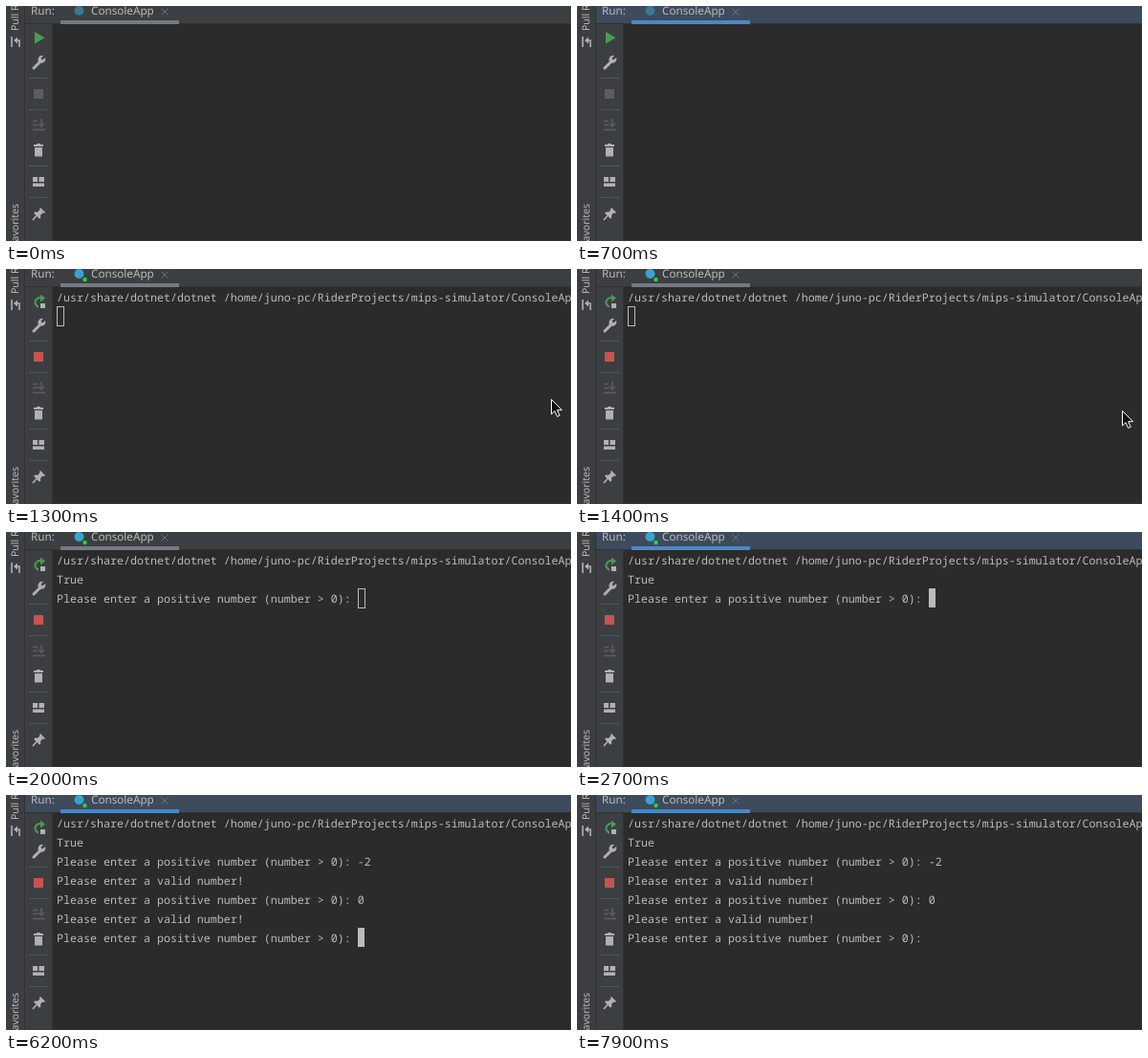
An HTML page that plays this animation: 591x246 px, repeating every 8000 ms.

```html
<!DOCTYPE html>
<html lang="en">
<head>
<meta charset="utf-8">
<title>Console run</title>
<style>
  html, body { margin: 0; width: 100%; height: 100%; overflow: hidden; background: #2b2b2b; }
  svg { display: block; width: 591px; height: 246px; }
  text { font: 11.7px "Noto Sans", sans-serif; fill: #bbb; white-space: pre; text-rendering: geometricPrecision; }
  .mono text { font: 11.667px "Noto Sans Mono", monospace; }
  .side text { font-size: 10.5px; }
  .code text { fill: #a9b7c6; }
  .code .num { fill: #606366; }
  .code tspan { fill: #cc7832; }
  .tree .cs { font-weight: 700; font-size: 12px; fill: #8cc474; }
  .panel { fill: #3c3f41; }
  .edge { fill: #323232; }
  .on { fill: #afb1b3; }
  .off { fill: #5b5d5f; }
  .line { fill: none; stroke: #afb1b3; stroke-width: 1.6; }
  .line.dim { stroke: #5b5d5f; }
  .sep { stroke: #515456; }
</style>
</head>
<body>
<svg viewBox="0 0 591 246">
  <rect width="591" height="246" fill="#2b2b2b"/>
  <rect class="panel" width="48" height="246"/>
  <path class="edge" d="M19 0h1v246h-1zM48 0h1v246h-1zM590 19h1v227h-1zM49 245h542v1h-542z"/>

  <g class="side">
    <text transform="translate(13 26) rotate(-90)">Pull Requests</text>
    <text transform="translate(13 207) rotate(-90)" text-anchor="end">Favorites</text>
    <path class="line" d="M6 32v11M14 43v-7h-4"/>
    <path class="on" d="M8 36l4-3.5v7z"/>
  </g>

  <g id="run">
    <rect id="runHead" x="20" width="571" height="18"/>
    <rect class="edge" x="20" y="18" width="571" height="1"/>
    <rect id="runBar" x="57" y="15" width="124" height="4"/>
    <text x="26" y="9">Run:</text>
    <circle id="badge" cx="76.5" cy="5" r="5"/>
    <text x="89" y="9">ConsoleApp</text>
    <path d="M162.500 2.500l7 7m0-7l-7 7" stroke="#6e7173" fill="none"/>

    <path id="play" d="M30 27l10.500 6.200L30 39.500z" fill="#499c54"/>
    <g id="live">
      <circle cx="82.500" cy="11" r="2.200" fill="#1fdc36"/>
      <path d="M34 39.500a4.700 4.700 0 1 1 2.500-9.200" fill="none" stroke="#499c54" stroke-width="2"/>
      <path d="M36 26.500l5 4-5 4z" fill="#499c54"/>
      <rect x="36" y="36" width="5" height="5" fill="#afb1b3"/>
    </g>
    <path d="M29 65l6-6" stroke="#afb1b3" stroke-width="3" stroke-linecap="round"/>
    <path class="on" d="M39 52l-2.500 2.800 1.700 1.700L41 54a4.200 4.200 0 0 1-6 5.200A4.200 4.200 0 0 1 39 52z"/>
    <rect id="stop" x="29" y="87" width="10" height="10"/>
    <path class="line dim" d="M28 120.500h5M28 124.500h5M28 129.500h13M37 118v8m-3-3l3 3 3-3" stroke-width="1.300"/>
    <path class="on" d="M32 144h4v1h3v2H29v-2h3zM30 148h8v9.500h-8z"/>
    <path class="on" d="M28 179h5v5h-5zM34.500 179h5.500v5h-5.500zM28 185.500h12v3.500h-12z"/>
    <path class="on" d="M36 211l5 5-1 1-1.500-.5-2.500 2.500.3 2.500-1.300 1.300-6-6 1.300-1.300 2.700.2 2.500-2.500-.5-1.200z"/>
    <path class="line" d="M32 219.500l-4 4.500"/>
    <path class="sep" d="M24 75.500h20M24 108.500h20M24 167.500h20M24 200.500h20"/>

    <g id="console" class="mono"></g>
    <rect id="caret" stroke="#bbb"/>
  </g>

  <g id="build">
    <svg width="591" height="82">
      <rect class="panel" x="20" width="304" height="82"/>
      <g id="tree" class="tree"></g>
    </svg>
    <svg width="591" height="59">
      <rect x="324" width="267" height="59" fill="#2b2b2b"/>
      <rect x="325" width="75" height="59" fill="#313335"/>
      <path d="M399.500 0v59" stroke="#555"/>
      <path d="M432.500 0v59M460.500 0v59M488.500 0v14" stroke="#393939"/>
      <g id="code" class="mono code"></g>
      <rect x="405" y="51" width="186" height="8" fill="#a6a6a6" opacity=".3"/>
    </svg>
    <rect x="324" y="59" width="267" height="24" fill="#313335"/>
    <path class="panel" d="M324 59h56l8 12-8 12h-56zM466 59h125v24H466l8-12z"/>
    <text x="411" y="75">()</text>
    <text x="427" y="75">Parser</text>
    <path d="M493 65l4 4-4 4-4-4zM499 67l3 3-3 3-3-3zM498 73l3.500 2.500-3.500 2.500-3-2.500z" fill="#d9a343"/>
    <text x="506" y="75">MipsParser</text>

    <rect class="edge" x="20" y="82" width="571" height="1"/>
    <rect x="20" y="83" width="571" height="27" fill="#3d4b5c"/>
    <rect x="64" y="106" width="116" height="4" fill="#4a88c7"/>
    <text x="26" y="100">Build:</text>
    <text x="76" y="100">Executing build...</text>

    <path d="M30 120l9 9" stroke="#b9736c" stroke-width="2"/>
    <path d="M27 129l9-9" stroke="#499c54" stroke-width="2.500"/>
    <path d="M33 117l3-1 4 4-2 3z" fill="#499c54"/>
    <path class="on" d="M27 141h6v4h-6zM35 145.500h6v3.500h-6zM35 151h6v3.500h-6z"/>
    <path class="line" d="M30.500 145v8h4.500m-4.500-6h4.500" stroke-width="1"/>
    <path class="line dim" d="M27 167.500h14M28.500 172v7.500h11v-7.500zM34 168v7m-3-3l3 3 3-3" stroke-width="1.300"/>
    <path class="sep" d="M24 189.500h20"/>
    <path class="line dim" d="M34 212v-11m-4.500 4.500l4.500-4.500 4.500 4.500M34 226v11m-4.500-4.500l4.500 4.500 4.500-4.500"/>
  </g>

  <path id="mouse" d="M.5.5v15.500l3.500-3.300 2.600 5.800 2.600-1.200-2.600-5.600h4.900z" fill="#111" stroke="#fff"/>
</svg>
<script>
const $ = id => document.getElementById(id);
const LOOP = 8000, ROW = 20, CELL = 7, LEFT = 53, TOP = 19;
const BUILD = 1000, LAUNCH = 1300;
const ask = 'Please enter a positive number (number > 0): ';
const retry = '\nPlease enter a valid number!\n' + ask;

// Time, appended output, caret style
const script = [
  [LAUNCH, '/usr/share/dotnet/dotnet /home/juno-pc/RiderProjects/mips-simulator/ConsoleApp/bin\n', 'box'],
  [1900, 'True\n' + ask, 'box'],
  [2700, '', 'block'], [3700, '', 'none'],
  [3900, '-', 'block'], [4600, '2', 'block'],
  [5000, retry, 'block'], [5500, '', 'none'],
  [5700, '0', 'block'],
  [6200, retry, 'block'], [6700, '', 'none'], [7400, '', 'block'], [7900, '', 'none']
];

// Pointer positions, one per 100 ms from BUILD
const trail = [[570, 60], [570, 84], [570, 112], [570, 136], [570, 148],
  [567, 142], [559, 129], [550, 119], [546, 115], [546, 115]];

const attrs = (el, values) => {
  for (const key in values) el.setAttribute(key, values[key]);
  return el;
};
const show = (id, on) => attrs($(id), { display: on ? 'inline' : 'none' });
const text = (parent, x, y, content, cls = '') => {
  const el = document.createElementNS('http://www.w3.org/2000/svg', 'text');
  el.textContent = content;
  return parent.appendChild(attrs(el, { x, y, class: cls }));
};

['AsciiDirective', 'AsciizDirective', 'BranchEquals', 'BranchEqualsZero', 'BranchGreaterThan']
  .forEach((name, i) => {
    text($('tree'), 99, 8 + i * ROW, 'C#', 'cs');
    text($('tree'), 117, 8 + i * ROW, name + '.cs');
  });

['    .Map(x => (', 'var stringLiteral', 'var integerLiteral', 'var commentP = ']
  .forEach((line, i) => {
    const y = 8 + i * 18;
    text($('code'), 336, y, 59 + i, 'num');
    text($('code'), 488, y, line).innerHTML = line.replace('>', '&gt;').replace(/^var/, '<tspan>var</tspan>');
  });

const rows = Array.from({ length: 7 }, (_, i) => text($('console'), LEFT, TOP + 15 + i * ROW, ''));

function drawConsole(t) {
  const past = script.filter(step => step[0] <= t);
  const lines = past.map(step => step[1]).join('').split('\n');
  const style = past.length ? past[past.length - 1][2] : 'none';
  rows.forEach((row, i) => {
    const line = lines[i] || '';
    if (row.textContent !== line) row.textContent = line;
  });
  const x = LEFT + lines[lines.length - 1].length * CELL;
  const y = TOP + (lines.length - 1) * ROW;
  show('caret', style !== 'none');
  attrs($('caret'), style === 'box'
    ? { x: x + .5, y: y + .5, width: CELL, height: ROW, fill: 'none', 'stroke-width': 1 }
    : { x, y, width: CELL, height: ROW, fill: '#bbb', 'stroke-width': 0 });
}

function draw(now) {
  const t = now % LOOP;
  const building = t >= BUILD && t < LAUNCH;
  const live = t >= LAUNCH;
  const focused = (t >= 700 && t < BUILD) || t >= 2700;

  show('run', !building);
  show('build', building);
  show('live', live);
  show('play', !live);
  attrs($('stop'), { fill: live ? '#c75450' : '#5b5d5f' });
  attrs($('badge'), { fill: live ? '#38a3cf' : '#3a7891' });
  attrs($('runHead'), { fill: focused ? '#3d4b5c' : '#3c3f41' });
  attrs($('runBar'), { fill: focused ? '#4a88c7' : '#747a80' });
  drawConsole(t);

  const spot = trail[Math.floor((t - BUILD) / 100)];
  show('mouse', spot);
  if (spot) attrs($('mouse'), { transform: `translate(${spot})` });
  requestAnimationFrame(draw);
}
draw(performance.now());
</script>
</body>
</html>
```
